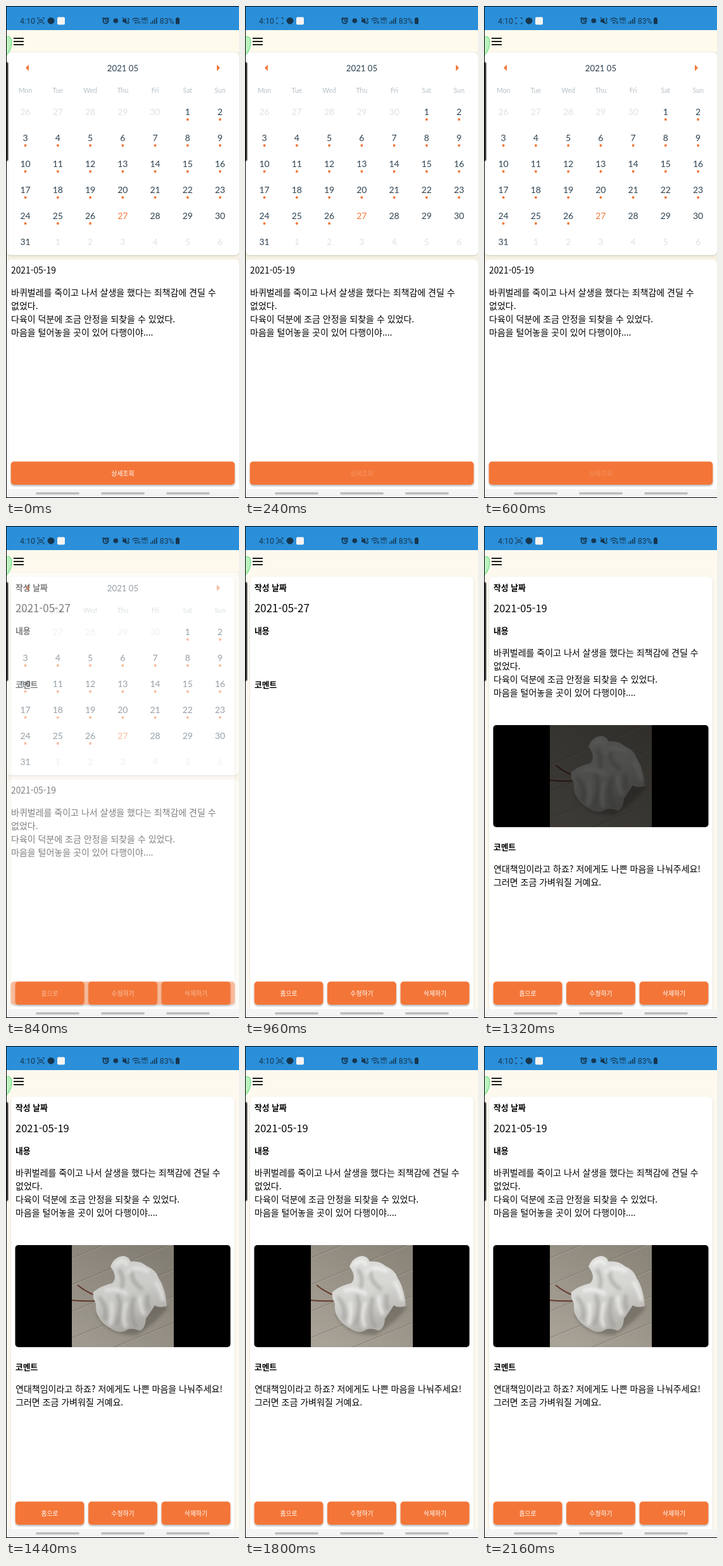
An HTML page that plays this animation: 368 px wide and 776 px high, repeating every 2520 ms.

```html
<!DOCTYPE html>
<html lang="ko">
<head>
<meta charset="utf-8">
<title>Diary</title>
<style>
html, body { margin: 0; width: 100%; height: 100%; overflow: hidden; background: #fdf9ef; }
svg { display: block; width: 100vw; height: 100vh; }
text { font-family: 'Noto Sans CJK KR', 'Noto Sans CJK JP', 'Noto Sans CJK', sans-serif; white-space: pre; }
.num { font-family: Lato, sans-serif; }
.bar { font-family: Roboto, sans-serif; }
</style>
</head>
<body>
<svg id="stage" viewBox="0 0 368 776" preserveAspectRatio="none"></svg>
<script>
const LOOP = 2520;
const ORANGE = '#f37637', INK = '#16364f';

// [time, value] steps; each value holds until the next
const STEPS = {
  press:  [[0, 1], [120, .6], [240, .24], [600, .2]],
  blink:  [[0, 1], [120, .4], [240, 0], [840, 1], [2040, .4], [2160, 0]],
  detail: [[0, 0], [840, .5], [960, 1]],
  empty:  [[0, 1], [1080, 0]],
  filled: [[0, 0], [1080, 1]],
  photo:  [[0, 0], [1080, .04], [1200, .15], [1320, .36], [1440, .95], [1560, 1]]
};

const rect = (x, y, w, h, fill, r = 0, more = '') =>
  `<rect x="${x}" y="${y}" width="${w}" height="${h}" rx="${r}" fill="${fill}" ${more}/>`;
const dot = (x, y, r, fill) => `<circle cx="${x}" cy="${y}" r="${r}" fill="${fill}"/>`;
const path = (d, fill, more = '') => `<path d="${d}" fill="${fill}" ${more}/>`;
const line = (d, stroke, w, more = '') =>
  path(d, 'none', `stroke="${stroke}" stroke-width="${w}" ${more}`);
const text = (s, x, y, size, fill = '#000', more = '') =>
  `<text x="${x}" y="${y}" font-size="${size}" fill="${fill}" ${more}>${s}</text>`;
const mid = (s, x, y, size, fill, cls = '') =>
  text(s, x, y, size, fill, `text-anchor="middle" class="${cls}"`);
const group = (id, body) => `<g id="${id}">${body}</g>`;
const lines = (list, x, y) =>
  list.map((s, i) => text(s, x, y + i * 21.1, 14)).join('');
const title = (s, y) => text(s, 15, y, 12.8, '#000', 'font-weight="700"');
const button = (x, w, label) =>
  rect(x, 718.6, w, 36.4, ORANGE, 5, 'filter="url(#lift)"') + label;

const NOTE = [
  '바퀴벌레를 죽이고 나서 살생을 했다는 죄책감에 견딜 수',
  '없었다.',
  '다육이 덕분에 조금 안정을 되찾을 수 있었다.',
  '마음을 털어놓을 곳이 있어 다행이야....'
];
const REPLY = [
  '연대책임이라고 하죠? 저에게도 나쁜 마음을 나눠주세요!',
  '그러면 조금 가벼워질 거예요.'
];

const defs = `<defs>
  <filter id="lift" x="-10%" y="-30%" width="120%" height="180%">
    <feDropShadow dx="0" dy="2" stdDeviation="1.8" flood-color="#000" flood-opacity=".3"/>
  </filter>
  <filter id="soft" x="-5%" y="-5%" width="110%" height="110%">
    <feDropShadow dx="0" dy="1" stdDeviation="1" flood-color="#776" flood-opacity=".35"/>
  </filter>
  <filter id="blur" x="-20%" y="-20%" width="140%" height="140%"><feGaussianBlur stdDeviation="2.5"/></filter>
  <linearGradient id="floor" x1=".8" x2=".2" y2="1">
    <stop stop-color="#8a8479"/><stop offset="1" stop-color="#a8a297"/>
  </linearGradient>
  <linearGradient id="paper" x2=".3" y2="1">
    <stop stop-color="#dededb"/><stop offset=".55" stop-color="#d6d6d3"/><stop offset="1" stop-color="#b5b3ae"/>
  </linearGradient>
  <clipPath id="frame"><rect x="104" y="314" width="161" height="161"/></clipPath>
</defs>`;

function calendar() {
  const col = i => 30.6 + i * 51.25;
  let out = mid('2021 05', 184.5, 102.5, 13.2, '#2d4150', 'num')
    + path('M36 92.5V102.5L31 97.5Z', ORANGE) + path('M333 92.5V102.5L338 97.5Z', ORANGE);
  ['Mon', 'Tue', 'Wed', 'Thu', 'Fri', 'Sat', 'Sun'].forEach((d, i) => {
    out += mid(d, col(i), 137.3, 10.5, '#b6c1c8', 'num');
  });
  for (let i = 0; i < 42; i++) {
    const day = i - 4, x = col(i % 7), y = 172 + Math.floor(i / 7) * 41;
    const inside = day > 0 && day < 32;
    const label = day < 1 ? day + 30 : inside ? day : day - 31;
    const fill = !inside ? '#dde2e5' : day === 27 ? ORANGE : '#2d4150';
    out += mid(label, x, y, 14, fill, 'num');
    if (inside && day < 27) out += dot(x, y + 7, 2, ORANGE);
  }
  return out;
}

function home() {
  return rect(0, 38, 368, 738, '#f6f0e3')
    + rect(0, 38, 368, 34, '#fffbec')
    + rect(1, 73, 367, 320, '#fff', 7, 'filter="url(#soft)"')
    + rect(1, 400, 367, 376, '#fff', 7)
    + calendar()
    + text('2021-05-19', 8, 422, 13.8)
    + lines(NOTE, 8, 456.5)
    + button(7.7, 353.6, group('press', mid('상세조회', 184.3, 741.2, 9.9, '#fff')));
}

function photo() {
  let planks = '';
  for (let i = 0; i < 6; i++) {
    const y = 334 + i * 42;
    planks += line(`M104 ${y}L265 ${y - 66}`, '#767067', 1, 'opacity=".6"')
      + line(`M104 ${y + 2}L265 ${y - 64}`, '#b3aea4', 1, 'opacity=".45"');
  }
  const shade = 'M178 352Q188 366 182 384M199 352Q196 372 216 384M146 396Q160 408 156 432'
    + 'M176 392Q186 414 174 440M202 396Q194 424 206 444M224 392Q222 408 226 416';
  const light = 'M172 346Q184 332 192 346M192 358Q202 344 226 356M236 372Q246 386 248 402'
    + 'M156 386Q178 380 192 392M166 404Q170 424 164 440M190 404Q182 428 190 444M212 394Q210 410 218 424';
  return `<g clip-path="url(#frame)">`
    + rect(104, 314, 161, 161, 'url(#floor)') + planks
    + path('M142 422Q160 458 206 456Q238 436 256 412L220 400Z', '#4b473f', 'opacity=".4" filter="url(#blur)"')
    + line('M104 401Q122 403 142 402M113 377Q125 387 142 394', '#663a2d', 2)
    + path('M165 348Q170 333 185 331Q194 332 197 340Q212 338 222 347Q238 354 241 366Q251 380 254 410'
      + 'Q242 414 235 409Q228 420 221 430Q220 446 211 449Q201 444 192 447Q182 455 168 447'
      + 'Q151 438 146 427Q141 420 142 406Q136 396 138 388Q150 378 168 374Q177 364 165 348Z', 'url(#paper)')
    + line(shade, '#8f8e89', 5, 'opacity=".55" filter="url(#blur)"')
    + line(light, '#fafaf8', 5, 'opacity=".75" filter="url(#blur)"')
    + '</g>';
}

function detail() {
  const buttons = [['홈으로', 14.7], ['수정하기', 130.1], ['삭제하기', 245.6]];
  return rect(0, 38, 368, 738, '#fdf9ef')
    + rect(8, 80, 353, 710, '#fff', 8, 'filter="url(#soft)"')
    + title('작성 날짜', 101.6) + title('내용', 169.8)
    + group('empty', text('2021-05-27', 15, 136, 16.9) + title('코멘트', 254.8))
    + group('filled', text('2021-05-19', 15, 136, 16.5)
      + lines(NOTE, 15, 204.5)
      + rect(14.5, 314, 340, 161, '#000', 5)
      + group('photo', photo())
      + title('코멘트', 510.8)
      + lines(REPLY, 15, 545.5))
    + buttons.map(([s, x]) => button(x, 108.8, mid(s, x + 54.4, 741.2, 9.9, '#fff'))).join('');
}

function statusBar() {
  const bars = [0, 1, 2, 3].map(i => rect(228 + i * 3, 25.5 - i * 2.5, 1.6, 2.5 + i * 2.5, INK)).join('');
  return rect(0, 0, 368, 38, '#2b8fd9')
    + text('4:10', 22, 28, 12.4, INK, 'class="bar"')
    + line('M50 21V18.5H52.5M57.5 18.5H60V21M60 25.5V28H57.5M52.5 28H50V25.5', INK, 1)
    + group('blink', line('M52.3 21.5H57.7V25.7H52.3Z', INK, 1) + dot(55, 23.5, 1, INK))
    + dot(71, 23.3, 5.4, INK)
    + rect(81, 17.5, 12, 12, '#f4f4f4', 2)
    + `<circle cx="157.5" cy="23.5" r="4" fill="none" stroke="${INK}" stroke-width="1.8"/>`
    + line('M157.5 21V24H160M152 20.5L155 18M163 20.5L160 18', INK, 1.3)
    + dot(173.3, 23.3, 3.8, INK)
    + path('M184 21.5H186.5L190 18.5V28L186.5 25.5H184Z', INK)
    + line('M184 18L193 28.5M192 19L194.5 20.5L192.5 23L194.5 25.5L193 28', INK, 1.2)
    + line('M199.5 21.5Q205 16.5 210.5 21.5M201.5 24Q205 20.8 208.5 24', INK, 1.3)
    + dot(205, 26.3, 1.4, INK)
    + line('M209 24V28M211.2 24V28', INK, 1)
    + text('HD', 214, 23.3, 7.4, INK, 'class="bar" font-weight="700"')
    + text('VoLT', 214.3, 28.3, 4.8, INK, 'class="bar"')
    + bars
    + text('83%', 242.8, 28, 12.3, INK, 'class="bar"')
    + rect(268, 19, 6, 9.5, INK, 1) + rect(269.6, 18, 2.8, 1.5, INK);
}

function chrome() {
  return statusBar()
    + [50, 55, 60].map(y => rect(12, y, 16, 1.9, '#111')).join('')
    + path('M0 49Q8 46 9 56Q9 69 1 77H0Z', '#b4f2ba', 'stroke="#74e38a" stroke-width="1.5" opacity=".9"')
    + rect(-6, 88, 10, 157, '#8a8a88', 3) + rect(-6, 89, 9, 155, '#333', 3)
    + rect(0, 762, 368, 14, '#f4f4f4')
    + [47, 150, 253].map(x => rect(x, 767, 69, 3.4, '#bdbdbd', 1.7)).join('')
    + rect(0, 0, 1, 776, '#000') + rect(0, 0, 368, 1, '#000') + rect(0, 775, 368, 1, '#000');
}

document.getElementById('stage').innerHTML =
  defs + home() + group('detail', detail()) + chrome();

const parts = Object.entries(STEPS).map(([id, steps]) => [document.getElementById(id), steps]);
const start = performance.now();

function draw(now) {
  const t = Math.max(0, now - start) % LOOP;
  for (const [el, steps] of parts) {
    let value = steps[0][1];
    for (const [at, v] of steps) if (t >= at) value = v;
    el.setAttribute('opacity', value);
  }
  requestAnimationFrame(draw);
}
draw(start);
</script>
</body>
</html>
```
